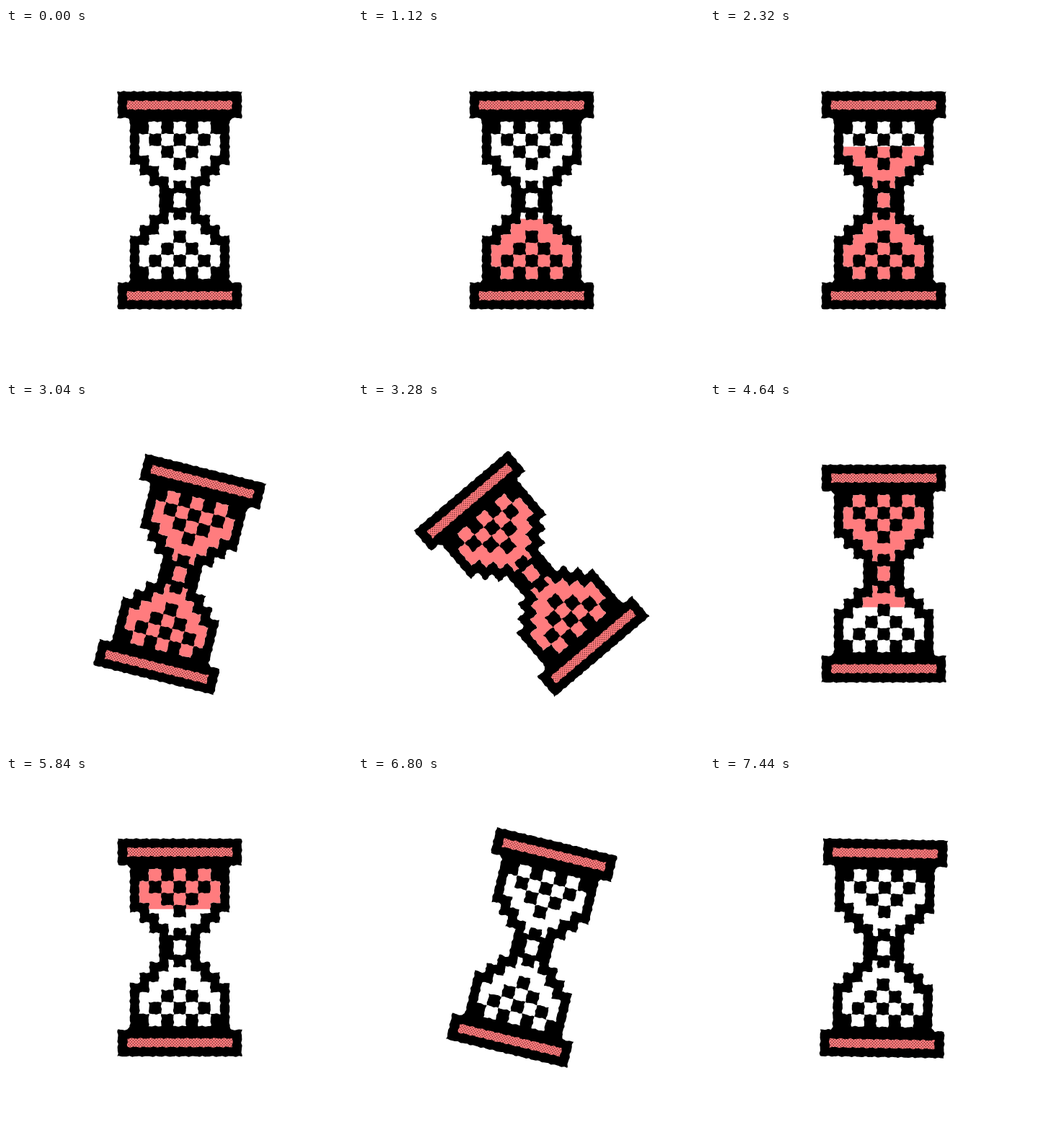
Animation, 480 px wide and 480 px high, one loop 7520 ms. Source, as an HTML page with a canvas:

```html
<!DOCTYPE html>
<html lang="en">
<head>
<meta charset="utf-8">
<title>Hourglass</title>
<style>
html, body { margin: 0; width: 100%; height: 100%; overflow: hidden; background: #fff; }
canvas { display: block; width: 480px; height: 480px; }
</style>
</head>
<body>
<canvas id="stage" width="480" height="480"></canvas>
<script>
const ctx = document.getElementById('stage').getContext('2d');
const LOOP = 7520, HALF = LOOP / 2, STEP = 80;
const PINK = '#ff7c7e';
const CX = 241, CY = 239, PIVOT_Y = 238.5;
const CELL = 17, STAIR_X = 13.5, STAIR_Y = 14.5;

const flipX = x => 2 * CX - x;
const flipY = y => 2 * CY - y;
const mirrorX = pts => pts.concat(pts.map(([x, y]) => [flipX(x), y]).reverse());
const mirrorY = pts => pts.map(([x, y]) => [x, flipY(y)]).reverse();

// Rough ink edge: a fixed warp of the plane
function warp(x, y) {
  return [
    x + 0.5 * Math.sin(y * 0.53 + x * 0.21) + 0.3 * Math.sin(y * 0.91 - x * 0.3 + 1),
    y + 0.5 * Math.sin(x * 0.49 - y * 0.17 + 2) + 0.3 * Math.sin(x * 0.87 + y * 0.3)
  ];
}

function addPoly(path, pts) {
  pts.forEach(([x, y], i) => {
    const [nx, ny] = pts[(i + 1) % pts.length];
    const n = Math.max(1, Math.round(Math.hypot(nx - x, ny - y) / 2));
    for (let k = 0; k < n; k++) {
      const p = warp(x + (nx - x) * k / n, y + (ny - y) * k / n);
      if (i + k) path.lineTo(...p); else path.moveTo(...p);
    }
  });
  path.closePath();
}

function addRect(path, x1, y1, x2, y2) {
  addPoly(path, [[x1, y1], [x2, y1], [x2, y2], [x1, y2]]);
}

// Three steps inwards, from the left wall towards the neck
function stairs(x, y) {
  const pts = [];
  for (let i = 0; i < 3; i++) {
    const sy = y + i * STAIR_Y;
    pts.push([x + i * STAIR_X, sy], [x + (i + 1) * STAIR_X, sy]);
  }
  return pts;
}

const side = [[155, 88], [155, 125], [169, 125], [172, 129], ...stairs(172, 190)];
const body = new Path2D();
addPoly(body, mirrorX(side.concat(mirrorY(side))));

// Round notches in the outer steps
const bites = new Path2D();
for (let i = 0; i < 3; i++) {
  const x = 181.5 + i * STAIR_X, y = 193.5 + i * STAIR_Y;
  for (const bx of [x, flipX(x)]) {
    for (const by of [y, flipY(y)]) {
      bites.moveTo(bx + 4.5, by);
      bites.arc(bx, by, 4.5, 0, Math.PI * 2);
    }
  }
}

// Glass interior: two bulbs and the neck
const bulb = mirrorX([[198, 130], [198, 147], [185, 147], ...stairs(185, 177), [225.5, 222]]);
const glass = new Path2D();
addPoly(glass, bulb);
addPoly(glass, mirrorY(bulb));
addRect(glass, 232.5, 229, 249.5, 249);

// Checker diamond in each bulb, plus a block at each end of the neck
const cells = new Path2D();
function addCell(col, y1, y2) {
  const x1 = CX + (col - 0.5) * CELL, x2 = x1 + CELL;
  addRect(cells, x1, y1, x2, y2);
  addRect(cells, x1, flipY(y2), x2, flipY(y1));
}
for (let row = 0; row < 4; row++) {
  for (let col = -2; col <= 2; col++) {
    const inside = Math.abs(col) + Math.abs(row - 1) <= 2;
    if (!inside || (row + col) % 2 === 0 && row !== 1 && row !== 3) continue;
    if ((row + col) % 2 === 0) continue;
    const y = 130 + row * 16.7;
    addCell(col, row ? y : y - 2, y + 16.7);
  }
}
addCell(0, 212, 224);

// Halftone bars
const bars = new Path2D(), dots = new Path2D();
for (const top of [101, 365.5]) {
  addRect(bars, 168, top, 313.5, top + 12);
  for (let r = 0; r < 6; r++) {
    for (let x = 169 + (r % 2) * 2; x < 313; x += 4) {
      dots.rect(x, top + 0.5 + r * 2, 1.2, 1.2);
    }
  }
}

// Half-turn in degrees, eased by the Bezier (0.68, 0, 0.2, 1.2)
const bezier = (s, a, b) => 3 * a * s * (1 - s) ** 2 + 3 * b * s * s * (1 - s) + s ** 3;
function turn(t, start, duration) {
  const x = Math.min(Math.max((t - start) / duration, 0), 1);
  let lo = 0, hi = 1;
  for (let i = 0; i < 30; i++) {
    const mid = (lo + hi) / 2;
    if (bezier(mid, 0.68, 0.2) < x) lo = mid; else hi = mid;
  }
  return 180 * bezier(hi, 0, 1.2);
}

function sandLevel(t) {
  const level = Math.max(119, 358 - (t % HALF) / 12);
  return t < HALF ? level : 2 * PIVOT_Y - level;
}

function fill(path, color) {
  ctx.fillStyle = color;
  ctx.fill(path);
}

function draw(t) {
  ctx.setTransform(1, 0, 0, 1, 0, 0);
  ctx.fillStyle = '#fff';
  ctx.fillRect(0, 0, 480, 480);
  ctx.translate(CX, PIVOT_Y);
  ctx.rotate((turn(t, 2825, 887) + turn(t, 6593, 867)) * Math.PI / 180);
  ctx.translate(-CX, -PIVOT_Y);

  fill(body, '#000');
  fill(bites, '#fff');
  fill(glass, '#fff');
  ctx.save();
  ctx.clip(glass);
  ctx.fillStyle = PINK;
  ctx.fillRect(160, sandLevel(t), 160, 400);
  ctx.restore();
  fill(cells, '#000');
  fill(bars, PINK);
  fill(dots, 'rgba(40, 0, 0, 0.8)');
}

const start = performance.now();
function frame() {
  const t = (performance.now() - start) % LOOP;
  draw(Math.floor(t / STEP) * STEP);
  requestAnimationFrame(frame);
}
frame();
</script>
</body>
</html>
```
